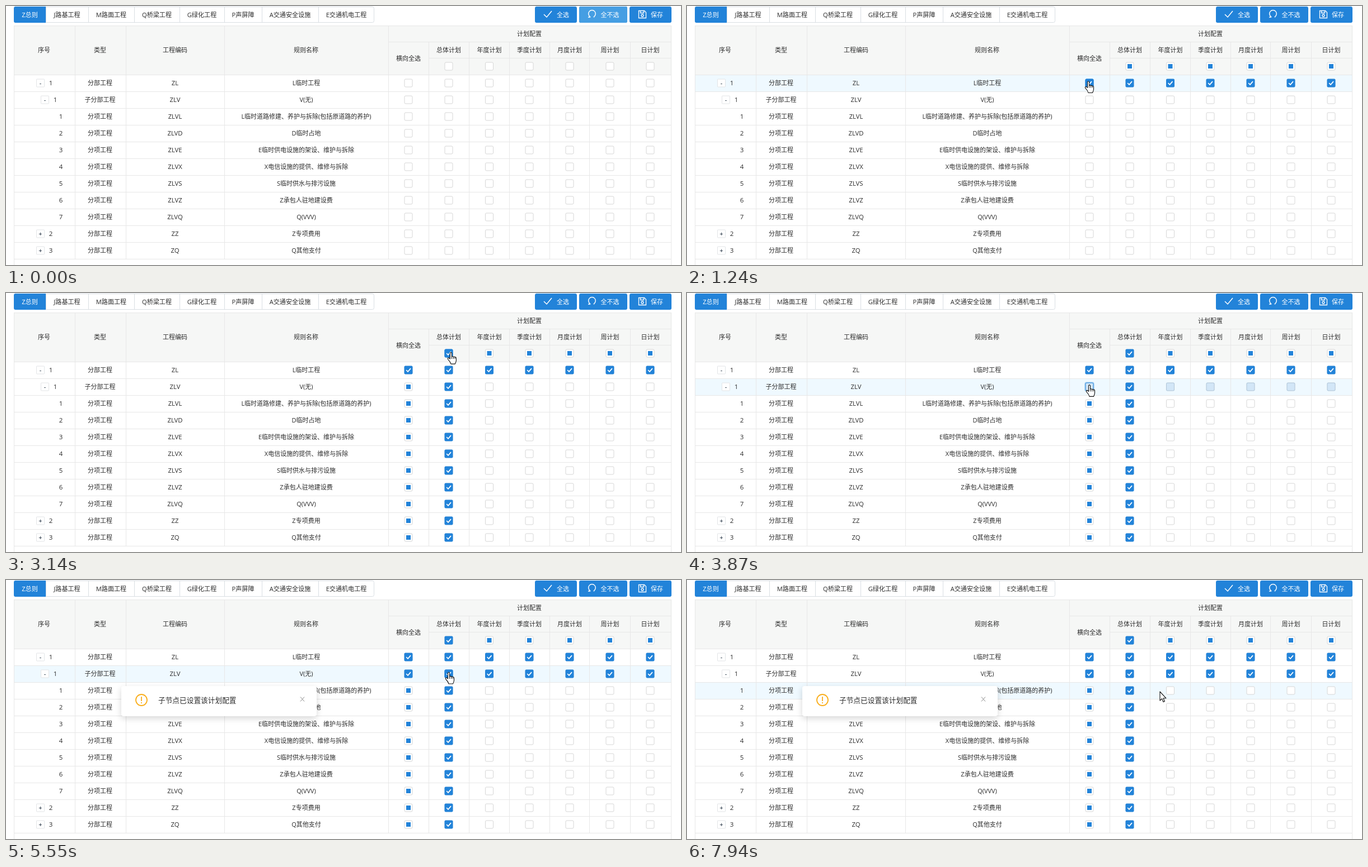
An HTML page with a canvas that plays this animation: 1206x464 px, repeating every 8000 ms.

```html
<!DOCTYPE html>
<html lang="zh-CN">
<head>
<meta charset="utf-8">
<style>
html, body { margin: 0; width: 100%; height: 100%; overflow: hidden; background: #fff; }
canvas { display: block; }
</style>
</head>
<body>
<canvas id="stage" width="1206" height="464"></canvas>
<script>
const ctx = document.getElementById('stage').getContext('2d');
const LOOP = 8000, FADE = 200;
const FONT = '"Open Sans", "Noto Sans CJK SC", "Noto Sans CJK", sans-serif';
const BLUE = '#2283d9', LINE = '#e7e7e7', TEXT = '#2c2c2c';

const tabs = ['Z总则', 'J路基工程', 'M路面工程', 'Q桥梁工程', 'G绿化工程', 'P声屏障', 'A交通安全设施', 'E交通机电工程'];
const tabEdges = [14, 71, 147, 229, 310, 390, 457, 558, 658];
const columns = [14, 123, 214, 390, 683, 755, 827, 899, 971, 1042, 1115, 1188];
const plans = ['总体计划', '年度计划', '季度计划', '月度计划', '周计划', '日计划'];
const boxX = [719, 791, 863.5, 935, 1007, 1079, 1151];
const HEAD_Y = 108;
const rowY = r => r < 0 ? HEAD_Y : 138 + 30 * r;

// number, x of number, type, code, name, toggle sign
const rows = [
  [1, 80, '分部工程', 'ZL', 'L临时工程', '-'],
  [1, 88, '子分部工程', 'ZLV', 'V(无)', '-'],
  [1, 98, '分项工程', 'ZLVL', 'L临时道路修建、养护与拆除(包括原道路的养护)'],
  [2, 98, '分项工程', 'ZLVD', 'D临时占地'],
  [3, 98, '分项工程', 'ZLVE', 'E临时供电设施的架设、维护与拆除'],
  [4, 98, '分项工程', 'ZLVX', 'X电信设施的提供、维修与拆除'],
  [5, 98, '分项工程', 'ZLVS', 'S临时供水与排污设施'],
  [6, 98, '分项工程', 'ZLVZ', 'Z承包人驻地建设费'],
  [7, 98, '分项工程', 'ZLVQ', 'Q(VVV)'],
  [2, 80, '分部工程', 'ZZ', 'Z专项费用', '+'],
  [3, 80, '分部工程', 'ZQ', 'Q其他支付', '+']
];

// Click times: first row, first plan column, second row; then the notice
const ROW_ONE = 890, COLUMN = 2540, ROW_TWO = 3830, NOTICE = 5030;
const pulses = [[ROW_ONE, 0, 0], [COLUMN, 1, -1], [ROW_TWO, 0, 1]];

// Pointer path: time, x, y
const path = [
  [80, 1050, 60], [160, 980, 180], [240, 880, 308], [320, 790, 290], [400, 730, 200],
  [470, 717, 145], [670, 717, 134], [1860, 717, 135], [2000, 750, 122], [2200, 791, 105],
  [2560, 791, 105], [2880, 795, 106], [3140, 795, 106], [3400, 765, 128], [3680, 719, 164],
  [4180, 719, 165], [4330, 765, 168], [4530, 812, 168], [4700, 795, 165], [4890, 791, 165],
  [6150, 791, 165], [6420, 775, 148], [6620, 750, 138], [6780, 712, 138], [6850, 688, 146],
  [6870, 674, 183], [6960, 652, 185], [7250, 735, 186], [7420, 790, 176], [7610, 822, 179],
  [7750, 848, 207], [7940, 845, 200]
];

const handShape = new Path2D('M-1.5 1.5Q0-1 1.5 1.5V8Q3.2 6.5 4.5 8.5Q6 7 7.3 9Q9 8 9.5 10.5V15Q9 18 7.5 21H0Q-1 17-5 13Q-6.5 10.5-4.5 10Q-3 10-1.5 12Z');
const arrowShape = new Path2D('M0 0V16L3.6 12.6L6 18.5L8.4 17.5L6 11.8H11Z');

const clamp = v => Math.max(0, Math.min(1, v));

function pointerAt(t) {
  if (t < path[0][0]) return null;
  const i = path.findIndex(p => p[0] > t);
  if (i < 0) return path[path.length - 1].slice(1);
  const [a, b] = [path[i - 1], path[i]];
  const k = (t - a[0]) / (b[0] - a[0]);
  return [a[1] + (b[1] - a[1]) * k, a[2] + (b[2] - a[2]) * k];
}

function rowAt(t) {
  const p = pointerAt(t);
  return p && p[1] >= 123 ? Math.floor((p[1] - 123) / 30) : -1;
}

// Share of the last FADE ms spent over each row gives a linear fade in and out
function rowGlow(t) {
  const glow = rows.map(() => 0), samples = 20;
  for (let i = 0; i < samples; i++) {
    const r = rowAt(t - FADE * i / samples);
    if (r >= 0) glow[r] += 1 / samples;
  }
  return glow;
}

function rect(x, y, w, h, color) {
  ctx.fillStyle = color;
  ctx.fillRect(x, y, w, h);
}
const hLine = (x, y, end) => rect(x, y, end - x, 1, LINE);
const vLine = (x, y, end) => rect(x, y, 1, end - y, LINE);

function panel(x, y, w, h, radius, fill, stroke) {
  ctx.beginPath();
  ctx.roundRect(x, y, w, h, radius);
  if (fill) { ctx.fillStyle = fill; ctx.fill(); }
  if (stroke) { ctx.strokeStyle = stroke; ctx.lineWidth = 1; ctx.stroke(); }
}

function label(text, x, y, color = TEXT, size = 11, align = 'center') {
  ctx.font = `${size}px ${FONT}`;
  ctx.textAlign = align;
  ctx.fillStyle = color;
  ctx.fillText(text, x, y + 4);
}

function stroke(d, color, width) {
  ctx.strokeStyle = color;
  ctx.lineWidth = width;
  ctx.stroke(new Path2D(d));
}

function boxState(r, c, t) {
  if (r === 0 && t >= ROW_ONE) return ['check', ROW_ONE];
  if (c === 1 && t >= COLUMN) return ['check', COLUMN];
  if (r === 1 && t >= ROW_TWO) return ['check', ROW_TWO];
  if (r < 0 && t >= ROW_ONE) return ['part', ROW_ONE];
  if (r > 0 && c === 0 && t >= COLUMN) return ['part', COLUMN];
  return ['empty', 0];
}

function checkbox(r, c, t, hovered) {
  const [kind, since] = boxState(r, c, t);
  const k = clamp((t - since) / FADE);
  ctx.save();
  ctx.translate(boxX[c], rowY(r));
  panel(-7, -7, 14, 14, 2, '#fff', hovered ? BLUE : '#d6d6d6');
  if (kind === 'check') {
    ctx.globalAlpha = k;
    panel(-7.5, -7.5, 15, 15, 2, BLUE);
    ctx.scale(k, k);
    stroke('M-3.8 0L-1 3L4-2.8', '#fff', 1.8);
  } else if (kind === 'part') {
    rect(-4 * k, -4 * k, 8 * k, 8 * k, BLUE);
  }
  ctx.restore();
}

function drawPulses(t) {
  for (const [start, c, r] of pulses) {
    const k = (t - start) / 360;
    if (k < 0 || k > 1) continue;
    const half = 7.5 * (1 + 0.6 * k);
    ctx.globalAlpha = 0.5 * (1 - k);
    panel(boxX[c] - half, rowY(r) - half, 2 * half, 2 * half, 2, null, BLUE);
    ctx.globalAlpha = 1;
  }
}

function drawToolbar(t) {
  panel(14.5, 1.5, 643, 28, 3, '#fff', '#d9dee3');
  panel(14, 1, 57, 29, [3, 0, 0, 3], BLUE);
  tabs.forEach((name, i) => {
    if (i) rect(tabEdges[i], 1, 1, 29, '#d9dee3');
    label(name, (tabEdges[i] + tabEdges[i + 1]) / 2, 16, i ? TEXT : '#fff', 11.1);
  });
  panel(945, 1, 75, 29, 3, BLUE);
  panel(1024, 1, 86, 29, 3, BLUE);
  ctx.globalAlpha = 1 - clamp((t - 80) / FADE);
  panel(1024, 1, 86, 29, 3, '#459ee3');
  ctx.globalAlpha = 1;
  panel(1114, 1, 75, 29, 3, BLUE);
  stroke('M961 15L966 20L975 9', '#fff', 1.5);
  stroke('M1040 20H1043.5V19A6.3 6.3 0 1 1 1050.5 19V20.5', '#fff', 1.4);
  stroke('M1130.5 8.5H1140.5L1143.5 11.5V21.5H1130.5ZM1133.5 8.5V12.5H1139.5V8.5M1139 17A2 2 0 1 1 1135 17A2 2 0 1 1 1139 17', '#fff', 1.3);
  label('全选', 995, 16, '#fff');
  label('全不选', 1079, 16, '#fff');
  label('保存', 1163, 16, '#fff');
}

function drawTable(t) {
  rect(14, 35, 1175, 88, '#f6f7f6');
  rowGlow(t).forEach((glow, r) => {
    ctx.globalAlpha = glow;
    rect(14, 123 + 30 * r, 1175, 30, '#eff9ff');
    ctx.globalAlpha = 1;
  });
  hLine(14, 35, 1189);
  hLine(683, 64, 1189);
  hLine(755, 93, 1189);
  for (let r = 0; r <= rows.length; r++) hLine(14, 123 + 30 * r, 1189);
  columns.forEach((x, i) => {
    const outer = i === 0 || i === columns.length - 1;
    vLine(x, i > 4 && !outer ? 64 : 35, outer ? 464 : 453);
  });
  label('序号', 68, 79);
  label('类型', 168, 79);
  label('工程编码', 302, 79);
  label('规则名称', 536, 79);
  label('计划配置', 935, 50);
  label('横向全选', 719, 94);
  plans.forEach((name, i) => label(name, boxX[i + 1], 79));

  rows.forEach(([number, x, type, code, name, sign], r) => {
    const y = rowY(r);
    if (sign) {
      panel(x - 25.5, y - 7, 14, 14, 1, '#fff', '#e2e4e6');
      label(sign, x - 18.5, y, '#123', 11);
    }
    label(number, x, y, TEXT, 11.5);
    label(type, 168, y);
    label(code, 302, y, TEXT, 11.3);
    label(name, 536.5, y);
  });
}

function drawNotice(t) {
  const k = clamp((t - NOTICE) / 350);
  if (!k) return;
  const eased = 1 - (1 - k) ** 3;
  ctx.save();
  ctx.globalAlpha = eased;
  ctx.translate(0, -28 * (1 - eased));
  ctx.shadowColor = 'rgba(0,0,0,.16)';
  ctx.shadowBlur = 12;
  ctx.shadowOffsetY = 4;
  panel(206, 190, 349, 54, 4, '#fff');
  ctx.shadowColor = 'transparent';
  stroke('M252 215A10 10 0 1 1 232 215A10 10 0 1 1 252 215M242 209V217M242 219V221', '#f9ae1c', 1.8);
  label('子节点已设置该计划配置', 272, 216, '#2c2c2c', 12.7, 'left');
  stroke('M526 209.5L533 217.5M533 209.5L526 217.5', '#888', 1);
  ctx.restore();
}

function drawPointer(p, isHand) {
  const shape = isHand ? handShape : arrowShape;
  ctx.save();
  ctx.translate(...p);
  ctx.lineJoin = 'round';
  ctx.fillStyle = '#fff';
  ctx.strokeStyle = '#111';
  ctx.lineWidth = 1.1;
  ctx.fill(shape);
  ctx.stroke(shape);
  if (isHand) stroke('M1.5 8V12M4.5 8.5V12M7.3 9V12', '#111', 1);
  ctx.restore();
}

function draw(t) {
  rect(0, 0, 1206, 464, '#fff');
  drawToolbar(t);
  drawTable(t);
  const p = pointerAt(t);
  let overBox = false;
  for (let r = -1; r < rows.length; r++) {
    for (let c = r < 0 ? 1 : 0; c < boxX.length; c++) {
      const hovered = !!p && Math.abs(p[0] - boxX[c]) < 7.5 && Math.abs(p[1] - rowY(r)) < 7.5;
      overBox ||= hovered;
      checkbox(r, c, t, hovered);
    }
  }
  drawPulses(t);
  drawNotice(t);
  if (p) drawPointer(p, overBox);
}

const start = performance.now();
function tick() {
  draw((performance.now() - start) % LOOP);
  requestAnimationFrame(tick);
}
tick();
</script>
</body>
</html>
```
